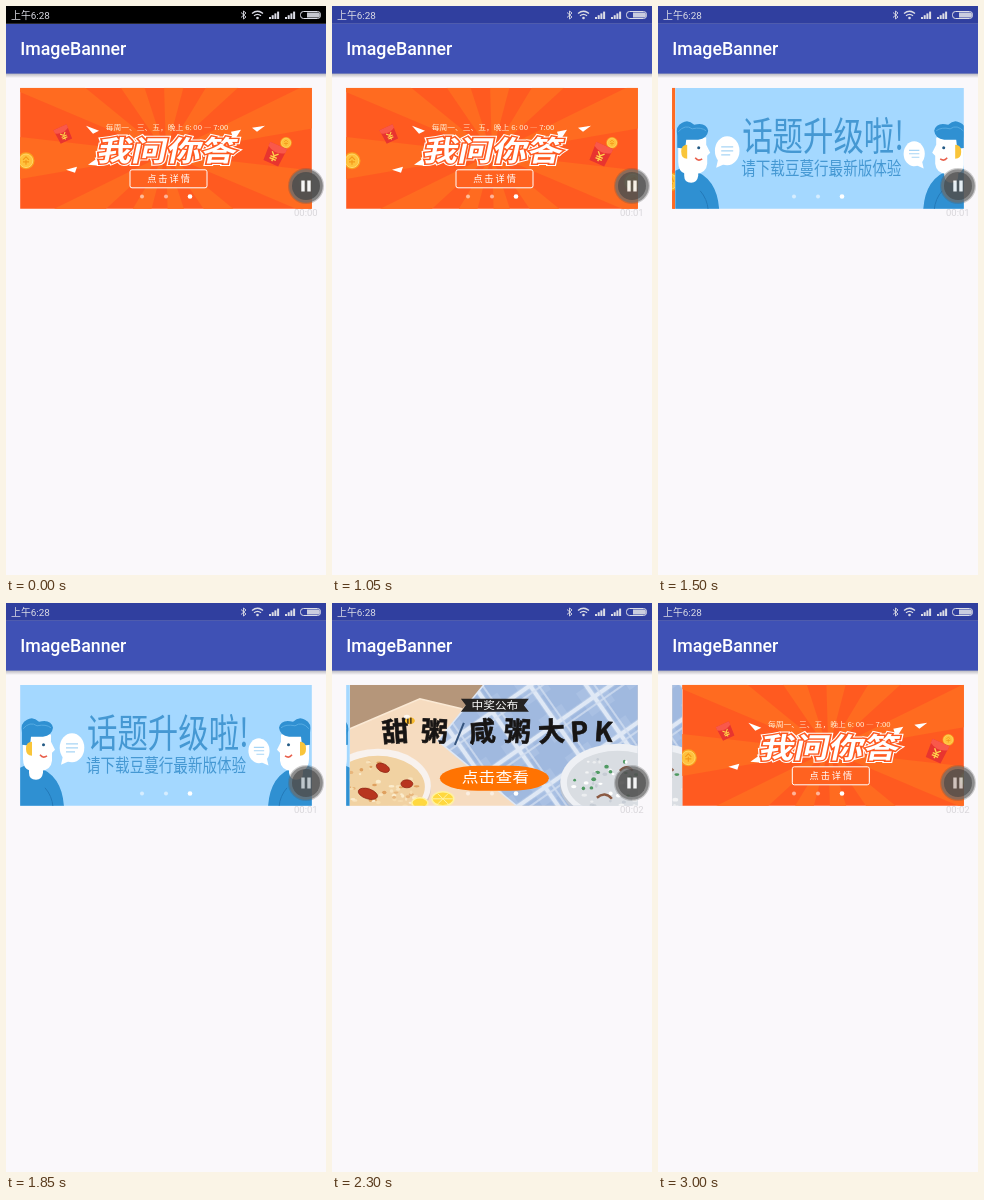
Write an HTML page that moves like this. It is 320 px wide and 569 px high and loops after 3050 ms.

```html
<!DOCTYPE html>
<html lang="zh">
<head>
<meta charset="utf-8">
<title>ImageBanner</title>
<style>
  html, body { margin: 0; width: 100%; height: 100%; overflow: hidden; background: #faf8fb; }
  svg { display: block; width: 100vw; height: 100vh; }
  text { font-family: "Noto Sans CJK SC", "Noto Sans CJK", "Noto Sans", sans-serif; }
  .ui { font-family: Roboto, "Noto Sans CJK SC", "Noto Sans CJK", sans-serif; }
  .mid { text-anchor: middle; }
</style>
</head>
<body>
<svg viewBox="0 0 320 569" preserveAspectRatio="none">
  <defs>
    <clipPath id="window"><rect x="14.200" y="81.800" width="291.600" height="121"/></clipPath>
    <clipPath id="page"><rect width="292" height="122"/></clipPath>
    <linearGradient id="shade" x2="0" y2="1">
      <stop stop-color="#b2b1b8"/><stop offset="1" stop-color="#faf8fb"/>
    </linearGradient>
    <pattern id="gingham" width="46" height="46" patternUnits="userSpaceOnUse" patternTransform="translate(6 3) rotate(-35)">
      <rect width="46" height="46" fill="#a9c0e3"/>
      <path d="M0 30H46M30 0V46" stroke="#94afd9" stroke-width="18" opacity=".4"/>
      <path d="M0 6H46M6 0V46" stroke="#dfe8f5" stroke-width="4.500"/>
      <path d="M0 13H46M13 0V46" stroke="#d3dff1" stroke-width="1.500"/>
    </pattern>

    <g id="coin">
      <circle r="8.500" fill="#f9a21f"/>
      <circle r="6.800" fill="#ffc23d" stroke="#ffe07a" stroke-width=".8"/>
      <path d="M-3 -1L0 -4L3 -1M-3 1H3M0 -1V4" fill="none" stroke="#f49a1a" stroke-width="1.200"/>
    </g>
    <g id="packet">
      <path d="M-8 -8L8 -8L7 9L-7 9Z" fill="#e8342f"/>
      <path d="M-8 -8H8V-4Q0 1 -8 -4Z" fill="#f9584a"/>
      <path d="M-3 -1L0 2L3 -1M-3 3H3M-3 5H3M0 2V7" fill="none" stroke="#ffd24a" stroke-width="1.200"/>
    </g>

    <g id="quiz" clip-path="url(#page)">
      <rect width="292" height="122" fill="#ff5a20"/>
      <path id="rays" fill="#ff6b20"/>
      <use href="#coin" transform="translate(6 73)"/>
      <use href="#packet" transform="translate(43 46) rotate(-25) scale(.9)"/>
      <use href="#coin" transform="translate(266 55) scale(.68)"/>
      <use href="#packet" transform="translate(255 66) rotate(24) scale(1.150)"/>
      <use href="#coin" transform="translate(287 94) rotate(20) scale(1.100)"/>
      <path d="M232 40L245 38L237 44ZM46 82L57 79L55 85ZM66 38L79 43L73 46ZM68 77L78 70L80 78ZM211 44L221 42L214 53Z" fill="#fff"/>
      <text class="mid" font-size="6.500" fill="#fff3dc" transform="translate(147 42) scale(1.200 1)">每周一、三、五，晚上 6: 00 — 7:00</text>
      <g class="mid" font-size="28.500" font-weight="900" transform="translate(145.500 73) skewX(-12) scale(1.220 1)">
        <text fill="#fff" stroke="#fff" stroke-width="4.800">我问你答</text>
        <text fill="#ff5a20" stroke="#ff5a20" stroke-width="2.800">我问你答</text>
        <text fill="#fff">我问你答</text>
      </g>
      <rect x="110" y="82" width="77" height="18" rx="2" fill="#ff6220" stroke="#fff"/>
      <text class="mid" x="149.500" y="94.500" font-size="9.200" letter-spacing="2" fill="#fff">点击详情</text>
    </g>

    <g id="man">
      <path d="M0 83Q8 78 17 82Q42 90 44 122H0Z" fill="#2f90d2"/>
      <path d="M9 70H23V88Q22 95 16 95Q9 95 9 88Z" fill="#fff"/>
      <path d="M3 50Q16 42 31 50V57L35 65L32 68V76Q31 86 20 86H10Q3 84 3 74Z" fill="#fff"/>
      <path d="M2 60V48Q0 38 7 35Q13 31 19 37Q31 34 33 43Q32 51 23 52H11L10 61Z" fill="#2f90d2"/>
      <path d="M3 44Q10 36 17 41Q26 39 31 43" fill="none" stroke="#56abe2"/>
      <path d="M12 57Q6 57 6 64Q6 71 12 71Z" fill="#f9c53a"/>
      <circle cx="23.500" cy="60" r="1.500" fill="#235a85"/>
      <path d="M20 70Q23 74 27 71" fill="none" stroke="#e8604c" stroke-width="1.500"/>
      <path d="M25 103Q32 111 33 122" fill="none" stroke="#2379b8"/>
    </g>
    <g id="bubble">
      <ellipse rx="12.300" ry="14.500" fill="#fff"/>
      <path d="M-9 8L-11 17L-2 13Z" fill="#fff"/>
      <path d="M-6 -4H6M-6 0H6M-6 4H3" stroke="#a8d5f5" stroke-width="1.300"/>
    </g>
    <g id="topic" clip-path="url(#page)">
      <rect width="292" height="122" fill="#a4d8ff"/>
      <use href="#man"/>
      <use href="#man" transform="translate(292 0) scale(-1 1)"/>
      <use href="#bubble" transform="translate(52 63)"/>
      <use href="#bubble" transform="translate(239 66) scale(-.86 .86)"/>
      <g fill="#4598d3">
        <text font-size="39" font-weight="300" transform="translate(67 62) scale(.78 1)">话题升级啦!</text>
        <text font-size="18" font-weight="350" transform="translate(66 87) scale(.81 1)">请下载豆蔓行最新版体验</text>
      </g>
    </g>

    <g id="food" clip-path="url(#page)">
      <rect width="292" height="122" fill="#f6dcc0"/>
      <path d="M0 0H145L112 24L70 14L0 44Z" fill="#b5967a"/>
      <path d="M0 44L70 14L112 24" fill="none" stroke="#fbead5" stroke-width="1.500"/>
      <path d="M134 0H292V122H168L88 56Z" fill="url(#gingham)"/>
      <path d="M134 0L88 56L168 122" fill="none" stroke="#dfe8f5" stroke-width="1.500"/>
      <ellipse cx="28" cy="104" rx="53" ry="38" fill="#dcc9bd"/>
      <ellipse cx="28" cy="101" rx="53" ry="37" fill="#f8f2ee"/>
      <ellipse cx="28" cy="102" rx="47" ry="31" fill="#f1d2a2"/>
      <g id="sweet"></g>
      <g fill="#b8351f" stroke="#8d2414" stroke-width=".7">
        <ellipse cx="18" cy="109" rx="10" ry="5" transform="rotate(18 18 109)"/>
        <ellipse cx="33" cy="83" rx="7" ry="4" transform="rotate(25 33 83)"/>
        <ellipse cx="57" cy="99" rx="6" ry="4"/>
      </g>
      <g fill="#ffd83f" stroke="#fff2a1" stroke-width="1.500">
        <ellipse cx="93" cy="114" rx="11" ry="7"/><ellipse cx="70" cy="118" rx="8" ry="5"/>
      </g>
      <path d="M83 114H103M88 109L98 119M98 109L88 119" stroke="#fff2a1"/>
      <ellipse cx="268" cy="100" rx="58" ry="38" fill="#bcc5d3"/>
      <ellipse cx="268" cy="97" rx="57.500" ry="38" fill="#eef0f4"/>
      <ellipse cx="268" cy="98" rx="51" ry="32" fill="#d9dde2"/>
      <g id="salty"></g>
      <path d="M247 113Q255 106 262 114M270 86Q277 79 283 86" fill="none" stroke="#8b5a43" stroke-width="2.500"/>
      <path d="M111 14H179L174 20.500L179 27H111L116 20.500Z" fill="#252322"/>
      <text class="mid" font-size="10" fill="#fff" transform="translate(145 24.500) scale(1.170 1)">中奖公布</text>
      <g id="words" class="mid" font-size="27" font-weight="900" fill="#171514" stroke="#171514" stroke-width=".6" stroke-linejoin="round"></g>
      <path d="M105 60L114 38" stroke="#35547d" stroke-width="2"/>
      <ellipse cx="60" cy="36" rx="5" ry="3.500" fill="#f6b92c"/>
      <path d="M58 33V39M61 33V39" stroke="#2a2118" stroke-width="1.300"/>
      <ellipse cx="57" cy="32" rx="3" ry="2" fill="#fff" opacity=".8"/>
      <rect x="90" y="81" width="109" height="25" rx="38" ry="12.500" fill="#ff7302"/>
      <text class="mid" font-size="14" font-weight="350" fill="#fff" transform="translate(145.500 97) scale(1.200 1)">点击查看</text>
    </g>
  </defs>

  <rect width="320" height="569" fill="#faf8fb"/>
  <rect y="67" width="320" height="5" fill="url(#shade)"/>
  <rect y="17.800" width="320" height="49.800" fill="#3f51b5"/>
  <rect id="status" width="320" height="17.800"/>
  <text class="ui" x="14.200" y="49.400" font-size="17.800" font-weight="500" fill="#fff">ImageBanner</text>

  <g fill="#dcdde6">
    <text class="ui" x="5" y="12.800" font-size="9.900">上午6:28</text>
    <path d="M235 6.500L240 11L237.500 13V5L240 7L235 11.500" fill="none" stroke="#dcdde6" stroke-width=".9"/>
    <path d="M246 7.500Q251.500 3 257 7.500M248 9.700Q251.500 7 255 9.700" fill="none" stroke="#dcdde6" stroke-width="1.300"/>
    <circle cx="251.500" cy="12" r="1.300"/>
    <g id="bars"></g>
    <rect x="294.500" y="5.500" width="20" height="7" rx="3" fill="none" stroke="#dcdde6"/>
    <path d="M301 6.500H312Q314 6.500 314 9Q314 11.500 312 11.500H301Z" opacity=".9"/>
  </g>

  <g clip-path="url(#window)">
    <g id="strip">
      <use href="#quiz"/>
      <use href="#topic" x="292"/>
      <use href="#food" x="584"/>
      <use href="#quiz" x="876"/>
    </g>
    <g fill="#fff">
      <circle cx="136" cy="190.500" r="2" opacity=".55"/>
      <circle cx="160" cy="190.500" r="2" opacity=".55"/>
      <circle cx="184" cy="190.500" r="2.300"/>
    </g>
  </g>

  <g id="button">
    <circle cx="300" cy="180" r="18" fill="#555" opacity=".3"/>
    <circle cx="300" cy="180" r="16.800" fill="#6e6e6e" opacity=".75"/>
    <circle cx="300" cy="180" r="14" fill="#4c4c4c" opacity=".85"/>
    <path id="pause" d="M297 174.500V185.500M303 174.500V185.500" stroke="#fff" stroke-width="3.400"/>
  </g>
  <text class="ui" id="timer" x="288" y="210" font-size="9.500" fill="#d8d6da"></text>
</svg>

<script>
const LOOP = 3050, PAGE = 292, GLIDE = 697;
const STARTS = [1065, 1881, 2664];
const $ = id => document.getElementById(id);
const clamp = x => Math.min(1, Math.max(0, x));

function seeded(seed) {
  return () => (seed = (seed * 16807) % 2147483647) / 2147483647;
}

function drawRays() {
  const n = 11, cx = 146, cy = 66;
  const at = a => `${cx + 240 * Math.cos(a)} ${cy + 240 * Math.sin(a)}`;
  let d = "";
  for (let i = 0; i < n; i++) {
    const a = (i + 0.2) * 2 * Math.PI / n;
    d += `M${cx} ${cy}L${at(a)}L${at(a + Math.PI / n)}Z`;
  }
  $("rays").setAttribute("d", d);
}

// Scatters small ingredients over an elliptical bowl
function scatter(id, cx, cy, rx, ry, count, colors, seed) {
  const rnd = seeded(seed);
  let out = "";
  for (let i = 0; i < count; i++) {
    const a = rnd() * 2 * Math.PI, r = Math.sqrt(rnd());
    const x = cx + rx * r * Math.cos(a), y = cy + ry * r * Math.sin(a);
    out += `<ellipse cx="${x}" cy="${y}" rx="${1.2 + rnd() * 1.8}" ry="${1 + rnd()}" fill="${colors[i % colors.length]}"/>`;
  }
  $(id).innerHTML = out;
}

function drawWords() {
  const words = [["甜", 46, -4], ["粥", 84, 3], ["咸", 133, -5], ["粥", 167, 3],
                 ["大", 202, -3], ["P", 230, -4], ["K", 253, 4]];
  $("words").innerHTML = words.map(([s, x, tilt]) =>
    `<text transform="translate(${x} 56.5) rotate(${tilt})">${s}</text>`).join("");
}

function drawSignal() {
  let out = "";
  for (const x of [263, 279]) {
    for (let i = 0; i < 4; i++) {
      const h = 2 + i * 1.8;
      out += `<rect x="${x + i * 2.7}" y="${13 - h}" width="2" height="${h}"/>`;
    }
  }
  $("bars").innerHTML = out;
}

// Quick start with a long, viscous settling
function viscous(t) {
  const curve = x => x < 1 ? x - 1 + Math.exp(-x)
                           : 1 - (1 - Math.exp(-1)) * Math.exp(1 - x);
  return curve(8 * clamp(t)) / curve(8);
}

function render(t) {
  const pages = STARTS.reduce((sum, s) => sum + viscous((t - s) / GLIDE), 0);
  $("strip").setAttribute("transform", `translate(${14 - PAGE * pages} 81.8)`);

  const fade = clamp((t - 30) / 420);
  const rgb = [48, 63, 159].map(c => Math.round(c * fade));
  $("status").setAttribute("fill", `rgb(${rgb})`);
  $("button").setAttribute("opacity", 1 - 0.08 * fade);

  const dim = (t >= 1550 && t < 2100) || t >= 2650;
  $("pause").setAttribute("opacity", dim ? 0.7 : 0.95);
  $("timer").textContent = "00:0" + (t < 1000 ? 0 : t < 2100 ? 1 : 2);
}

drawRays();
scatter("sweet", 28, 102, 42, 26, 60, ["#f8e3bd", "#e8b67c", "#fbeccd", "#f6dcae", "#dfa05f"], 17);
scatter("salty", 268, 98, 47, 28, 60, ["#f3f4f5", "#4f9a62", "#fff", "#eceef0", "#c6ccd4"], 29);
drawWords();
drawSignal();

const began = performance.now();
function tick() {
  render((performance.now() - began) % LOOP);
  requestAnimationFrame(tick);
}
tick();
</script>
</body>
</html>
```
